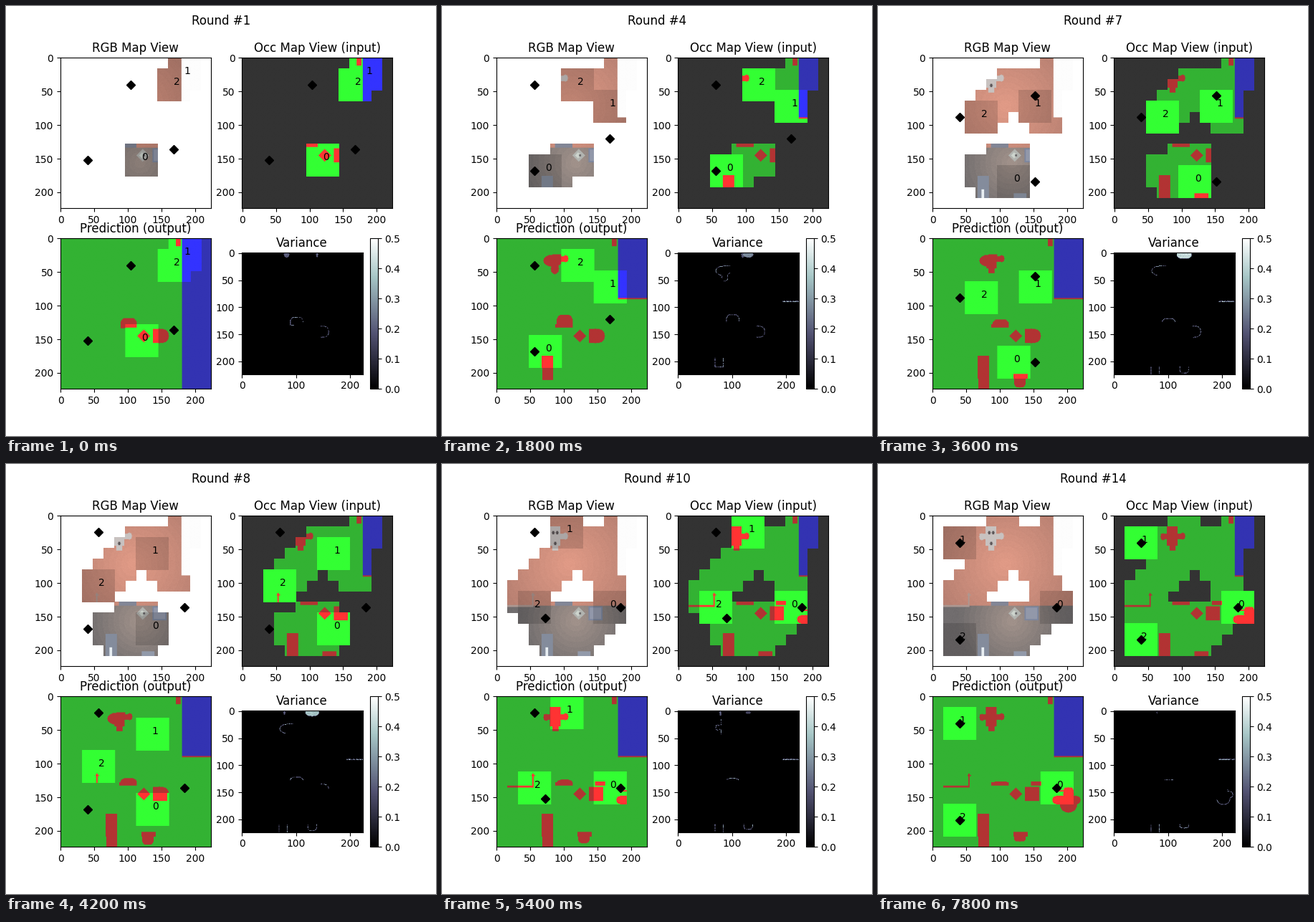
Animation of 600 by 600 pixels, one loop 8 s. Source, as a matplotlib script:

```python
import numpy as np
import matplotlib.pyplot as plt
from matplotlib.animation import FuncAnimation

SIZE, CELL, VIEW = 224, 16, 24
FRAMES, INTERVAL, HOLD = 40, 200, 3
ROUNDS = -(-FRAMES // HOLD)
Y, X = np.mgrid[:SIZE, :SIZE]
FREE, WALL, BLOCK = 0, 1, 2

# Per agent: start cell, then the goal cell chosen at certain rounds
STARTS = [(7, 9), (11, 1), (10, 2)]
GOALS = [
    {1: (2, 9), 3: (3, 10), 5: (8, 11), 7: (9, 11), 8: (11, 8)},
    {1: (10, 8), 3: (10, 7), 5: (10, 5), 7: (9, 3), 8: (3, 1), 11: (2, 2)},
    {1: (6, 2), 3: (3, 2), 5: (2, 5), 8: (2, 10), 10: (4, 9), 11: (2, 11)},
]


def simulate():
    """Each agent steps one cell towards its current goal every round."""
    cells = np.array(STARTS)
    goals = np.zeros_like(cells)
    steps = []
    for n in range(1, ROUNDS + 1):
        for a, plan in enumerate(GOALS):
            goals[a] = plan.get(n, goals[a])
        if n > 1:
            cells = cells + np.sign(goals - cells)
        steps.append((CELL * cells + CELL // 2, CELL * goals + CELL // 2))
    return steps


def box(x0, y0, x1, y1):
    return (X >= x0) & (X < x1) & (Y >= y0) & (Y < y1)


def oval(cx, cy, rx, ry, power=2):
    return np.abs((X - cx) / rx) ** power + np.abs((Y - cy) / ry) ** power <= 1


def gem(cx, cy, r):
    return np.abs(X - cx) + np.abs(Y - cy) <= r


def dome(x0, x1, top, base):
    return oval((x0 + x1) / 2, base, (x1 - x0) / 2, base - top, 3.5) & (Y < base)


def cross():
    return (box(79, 16, 95, 45) | box(83, 45, 92, 52) | box(70, 27, 104, 35)
            | oval(73, 31, 4, 5) | oval(102, 30, 4, 5))


def hull():
    return (oval(198, 154, 21, 7, 3) | oval(201, 160, 13, 13)
            | oval(201, 145, 8, 10, 3))


def rail():
    return box(186, 140, 209, 142)


def hook():
    return box(16, 133, 55, 136) | box(53, 115, 55, 136) | box(52, 117, 57, 119)


def wall(bottom=89):
    return box(180, 0, SIZE, bottom)


def seam():
    return box(180, 89, SIZE, 91)


def make_truth():
    world = np.where(wall(), WALL, FREE)
    solid = (box(171, 0, 178, 12) | box(87, 127, 113, 133) | gem(123, 145, 9)
             | box(137, 135, 158, 156) | box(146, 127, 161, 133)
             | box(67, 175, 84, SIZE) | box(120, 202, 141, 209)
             | hook() | cross() | hull() | rail() | seam())
    world[solid] = BLOCK
    return world


def make_guess(n):
    """Predicted classes for round n, refined as more has been seen."""
    guess = np.where(wall(89 if n >= 4 else SIZE), WALL, FREE)
    top = np.interp(n, [1, 3, 5, 12], [118, 108, 118, 126])
    solid = dome(88, 113, top, 134) | oval(146, 145, 14, 11, 2.3)
    if n >= 3:
        solid |= box(68, 175, 84, np.interp(n, [3, 5], [198, SIZE]))
    if n >= 4:
        solid |= seam()
    if n >= 10:
        solid |= cross()
    elif n >= 4:
        solid |= oval(83, 33, 14, 9) | box(83, 24, 105, 36) | oval(86, 45, 6, 8)
    if n >= 6:
        low = np.interp(n, [6, 7, 12], [215, 222, 216])
        solid |= box(120, 202, 141, 209) | oval(129, 208, 9, low - 208, 3)
    if n >= 9:
        solid |= dome(146, 161, np.interp(n, [9, 12], [120, 127]), 134)
    if n >= 11:
        solid |= hull() | rail()
    guess[solid] = BLOCK
    return guess


def make_photo():
    """Soft colour picture of the floor and the things standing on it."""
    rng = np.random.default_rng(4)
    far = (np.hypot(X - 108, Y - 72) // 9)[..., None]
    ring = (np.hypot(X - 118, Y - 156) // 8)[..., None]
    warm = np.array([224, 154, 134]) - far * [3.6, 2.3, 1.8]
    cool = np.maximum([160, 145, 138] - ring * [5, 3.8, 3], [113, 109, 110])
    photo = np.where((Y < 134)[..., None], warm, cool)
    photo += rng.normal(0, 1.5, (SIZE, SIZE, 1))

    def paint(mask, *color):
        photo[mask] = color

    paint(hook(), 172, 152, 146)
    paint(box(87, 128, 113, 134), 130, 134, 150)
    paint(box(137, 135, 158, 156), 124, 134, 158)
    paint(box(139, 137, 156, 154), 146, 152, 170)
    paint(gem(122, 145, 9), 178, 180, 176)
    paint(gem(121, 145, 4), 205, 212, 205)
    paint(box(123, 144, 126, 147), 110, 108, 110)
    paint(box(67, 176, 84, SIZE), 132, 140, 156)
    paint(box(73, 196, 77, SIZE), 232, 238, 242)
    paint(box(121, 202, 140, SIZE), 146, 154, 170)
    paint(cross(), 200, 194, 192)
    for cx, cy in ((84, 25), (90, 25), (87, 41)):
        paint(oval(cx, cy, 2, 2.5), 92, 86, 88)
    paint(wall(), 253, 253, 253)
    return np.clip(photo, 0, 255) / 255


def paint_classes(classes, lit):
    image = np.full((SIZE, SIZE, 3), .2)
    level = np.where(lit, 1.0, .7)
    for kind, channel in ((FREE, 1), (WALL, 2), (BLOCK, 0)):
        hit = classes == kind
        image[hit, channel] = level[hit]
    return image


def outline(mask):
    p = np.pad(mask, 1, mode="edge")
    return mask & ~(p[:-2, 1:-1] & p[2:, 1:-1] & p[1:-1, :-2] & p[1:-1, 2:])


def make_variance(n, guess, seen):
    """Predicted outlines glow, with a blob at the top that swells and fades."""
    rng = np.random.default_rng(n)
    noise = rng.random((SIZE, SIZE))
    edge = outline(guess == BLOCK) & ~seen & (noise > .25)
    out = np.where(edge, .1 + .4 * noise, 0)
    swell = max(0, np.sin(np.pi * (n - 2) / 9))
    blob = oval(129, 3, 14 * swell + .1, 8 * swell + .1, 2.5)
    out[blob] = .47 * swell * (.8 + .2 * noise[blob])
    for _ in range(2):
        cx, rx, ry = rng.integers((60, 2, 2), (160, 7, 7))
        spot = oval(cx, 3, rx, ry) & ~seen & ~blob
        out[spot] = .15 + .1 * noise[spot]
    return out


def make_rounds():
    truth, photo = make_truth(), make_photo()
    seen = np.zeros((SIZE, SIZE), bool)
    rounds = []
    for n, (agents, _) in enumerate(steps, 1):
        views = [box(x - VIEW, y - VIEW, x + VIEW + 1, y + VIEW + 1)
                 for x, y in agents]
        lit = np.any(views, axis=0)
        seen = seen | lit
        known = seen[..., None]
        guess = make_guess(n)
        shade = np.where(lit & (truth != WALL), .86, 1)[..., None]
        rgb = np.where(known, photo * shade, 1)
        occ = np.where(known, paint_classes(truth, lit), .2)
        pred = paint_classes(np.where(seen, truth, guess), lit)
        rounds.append((rgb, occ, pred, make_variance(n, guess, seen)))
    return rounds


steps = simulate()
rounds = make_rounds()
fig, axes = plt.subplots(2, 2, figsize=(6, 6), dpi=100)
heading = fig.suptitle("Round #1")
titles = ["RGB Map View", "Occ Map View (input)", "Prediction (output)", "Variance"]
images, markers, labels = [], [], []
for k, (ax, title) in enumerate(zip(axes.flat, titles)):
    ax.set_title(title)
    images.append(ax.imshow(rounds[0][k], cmap="bone", vmin=0, vmax=.5))
    if k < 3:
        markers += ax.plot([0], [0], "kD", scalex=False, scaley=False)
        labels.append([ax.text(0, 0, str(a)) for a in range(len(STARTS))])
fig.colorbar(images[3], ax=axes[1, 1])


def draw(i):
    r = i // HOLD
    agents, goals = steps[r]
    heading.set_text(f"Round #{r + 1}")
    for image, data in zip(images, rounds[r]):
        image.set_data(data)
    for marker in markers:
        marker.set_data(goals[:, 0], goals[:, 1])
    for group in labels:
        for label, spot in zip(group, agents):
            label.set_position(spot)
    return images


anim = FuncAnimation(fig, draw, frames=FRAMES, interval=INTERVAL,
                     repeat=True, repeat_delay=0)
plt.show()
```
